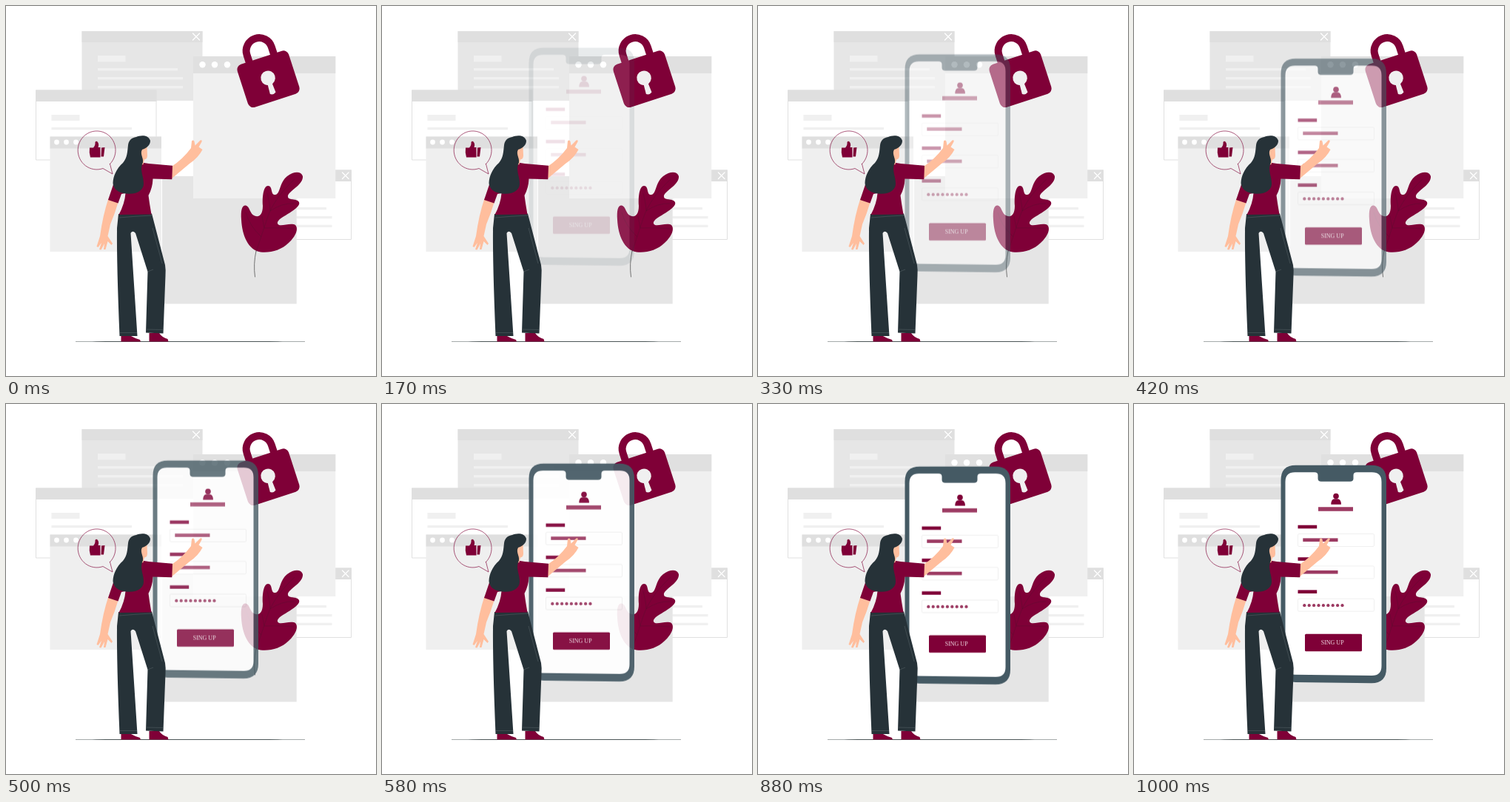
Animation, 500 px wide and 500 px high, one loop 1040 ms. Source, as an HTML page:

```html
<!DOCTYPE html>
<html lang="en">
<head>
<meta charset="utf-8">
<title>Sign up</title>
<style>
  html, body { margin: 0; width: 100%; height: 100%; overflow: hidden; background: #fff; }
  svg { display: block; width: 100vw; height: 100vh; }
  .wine { fill: #7f0037; }
  .soft { fill: #9c3a62; }
  .skin { fill: #ffbe9d; }
  .dark { fill: #263238; }
  .bar { fill: #dfdfdf; }
  .pale { fill: #f0f0f0; }
  .line { fill: none; stroke-linecap: round; stroke-linejoin: round; }
  .seam { fill: none; stroke: #5b666b; stroke-width: .5; }
  .vein { fill: none; stroke: #51132f; stroke-width: .6; opacity: .6; }
  .field { fill: #fff; stroke: #e6e6e6; stroke-width: .6; }
  #phone { opacity: 0; }
  #phone text { font: 8px "Liberation Serif", "Times New Roman", serif; fill: #f0dce4; }
</style>
</head>
<body>
<svg viewBox="0 0 500 500">
  <g id="windows">
    <path fill="#e6e6e6" d="M102.500 34H265.500V128H102.500Z"/>
    <path class="bar" d="M102.500 34H265.500V49H102.500Z"/>
    <path class="line" stroke="#fff" stroke-width="1.300" d="M252.500 37l9 9m0-9l-9 9"/>
    <path class="pale" d="M124 67h37.500v8.500H124zM124 84h108v3.200H124zM124 96h115v3.200H124zM124 108h115v3.200H124z"/>

    <path fill="#fff" stroke="#e0e0e0" d="M40.500 114H203V208H40.500Z"/>
    <path class="bar" d="M40 113.500H203.500V129H40Z"/>
    <path class="pale" d="M61.500 147h38v8h-38zM61.500 164h108.500v3.300h-108.500z"/>

    <path fill="#efefef" d="M59.500 176.500H210V332H59.500Z"/>
    <path class="bar" d="M59.500 176.500H210V192.500H59.500Z"/>
    <g fill="#fff"><circle cx="68.500" cy="184" r="3.400"/><circle cx="81.500" cy="184" r="3.400"/><circle cx="94.500" cy="184" r="3.400"/></g>

    <path fill="#fff" stroke="#e0e0e0" d="M303 222H466.500V315.500H303Z"/>
    <path class="bar" d="M303 221.500H467V237H303Z"/>
    <path class="line" stroke="#fff" stroke-width="1.300" d="M454.500 225l8.500 8.500m0-8.500l-8.500 8.500"/>
    <path class="pale" d="M325 272h108v3.200H325zM325 284h115.500v3.200H325zM325 295.800h115.500v3.200H325z"/>

    <path fill="#e5e5e5" d="M211 230H392.700V402.500H211Z"/>
    <path fill="#f0f0f0" d="M253 68H445.300V260H253Z"/>
    <path fill="#e0e0e0" d="M253 68H445.300V91H253Z"/>
    <g fill="#fff"><circle cx="265.500" cy="79.300" r="4.200"/><circle cx="282" cy="79.300" r="4.200"/><circle cx="299" cy="79.300" r="4.200"/></g>
  </g>

  <g id="lock" transform="translate(354.500 98.700) rotate(-18)">
    <path class="line" stroke="#7f0037" stroke-width="10" stroke-linecap="butt" d="M-17.500-26V-40a17.500 17.500 0 0 1 35 0V-26"/>
    <rect class="wine" x="-36.500" y="-30.500" width="73" height="61" rx="7.500"/>
    <path class="pale" d="M-3 5L-4 20Q0 23 4 20L3 5Z"/>
    <circle class="pale" cy="-1.500" r="9.800"/>
  </g>

  <g id="leaf">
    <path class="wine" d="M344 332.500C327 330 319 309 318 289C317 276 319 269 324 269.500C330 271 329 281 336 283.500C343 286 347 281 347 270C346 254 349 243 354 243C361 243 357 256 364 255C371 254 369 239 380 230C389 223 399 223 401 230C402 241 384 249 381 256C380 263 389 260 394 263C400 267 393 273 387 277C379 283 366 288 367 294C369 300 384 292 391 296C396 301 391 312 382 320C372 330 357 334 344 332.500Z"/>
    <path class="vein" d="M390 234C374 249 360 266 353 287Q346 308 338 332M353 253Q357 269 357 277M357 277Q373 266 389 267M349 300Q371 299 389 301M345 312Q329 297 324 279M349 300L346 284"/>
    <path class="line" stroke="#555" stroke-width=".8" d="M338 331Q334 349 336.500 366"/>
  </g>

  <g id="phone">
    <path fill="#455a64" d="M218.500 82.700H321Q341 82.700 341 102.700V357.300Q341 377.300 321 377.300L218.500 376Q198.500 375.500 198.500 356V102.700Q198.500 82.700 218.500 82.700Z"/>
    <path fill="#fff" d="M217.500 92.200H244Q248.500 92.200 248.500 96.200V100.700Q248.500 104.700 253 104.700H292Q296.500 104.700 296.500 100.700V96.200Q296.500 92.200 301 92.200H321.500Q334.500 92.200 334.500 105.200V354Q334.500 367 321.500 367L217.500 365.800Q204.500 365.500 204.500 353V105.200Q204.500 92.200 217.500 92.200Z"/>
    <circle class="wine" cx="273" cy="124.500" r="3.800"/>
    <path class="wine" d="M266.300 135.700Q266.300 128.700 271 128.300H275Q279.900 128.700 279.900 135.700Z"/>
    <path class="soft" d="M249 139.200h47v5.500h-47z"/>
    <g id="form"></g>
    <rect class="wine" x="231" y="310.700" width="77" height="23.500" rx="1.500"/>
    <text x="252.700" y="325">SING UP</text>
  </g>

  <path fill="#4c5657" d="M94 453.200H404V453.700H94ZM112 453.500Q120 452.900 135 452.900H355Q372 452.900 380 453.500Q368 454 355 454H135Q120 454 112 453.500Z"/>

  <g id="bubble">
    <path class="line" stroke="#7f0037" stroke-width=".65" d="M140.500 213.500L144 227L131 219.500A25.500 26 0 1 1 140.500 213.500Z"/>
    <path class="wine" d="M113 191.500H118Q121 188 120.500 184Q122 181.500 124 184Q126 187 124.500 191H127.500V204.500H114Q112 198 113 191.500ZM129 191.500L133.500 191L132 203.500H128.500Z"/>
  </g>

  <g id="woman">
    <path class="skin" d="M138.500 260L152 264Q147 281 141 295L137.500 311L144 321L142.500 323L137.500 318L134.500 329L132 329L133 321L128.500 329.500L126 329L129 320L124.500 326L122.500 325L127 311Q131 282 138.500 260Z"/>
    <path class="skin" d="M223 217.500Q239 207 250 192L251 182.500Q253 180.500 254.500 183L255.500 188.500L262.500 181.500Q265.500 180.500 264.500 183.500L260.500 190.500L265.500 194Q260 205 248 213L223 234Z"/>
    <path class="wine" d="M155.500 446L168 445.500Q174 449 181 451L182 453.500H155.500ZM193.500 442H207Q211 448 218.500 450L219.500 453.500H193.500Z"/>
    <path class="dark" d="M152 281L197 280.500L215 350Q216 356 215.500 364L212.500 442.500L189 441.500L191.500 359L175 307Q171 302.500 168.500 307L177.500 446L153.500 446Q149.500 350 150 300Z"/>
    <path class="seam" d="M153 286Q175 284 197 283M198 300L211 348M191.500 359L199 356M154 441.500L177 441.500M190 437L212 437.500"/>
    <path class="wine" d="M180 211Q187 212 193 213L225 215.800L224.300 234.200L198.500 233.500Q198 246 192.500 256Q194 268 196.500 281.500L152.500 282Q160.500 267 161.500 253L156 254L151.500 266.500L138 262L148.500 231Z"/>
    <path class="skin" d="M181 190H190.500L191 202Q191 207 187 207.500L185.500 214L179 216Z"/>
    <path class="dark" d="M195 182C193 174 182 174 176 177C170 178 166 181 165 188C164 197 164 205 158 212C149 220 145 230 144.500 239C145 250 157 254 167 253.800C179 253.500 186 248 186 240C186 230 181 223 184 214C188 207 180 201 184 194C190 192 195 188 195 182Z"/>
  </g>
</svg>
<script>
  const LOOP = 1040, FRAMES = 24, DROP = 30;

  // Three labelled fields: two filled lines and a masked password
  const rows = [163.700, 207.200, 251.400];
  const box = (cls, x, y, w, h, r = 0) =>
    `<rect class="${cls}" x="${x}" y="${y}" width="${w}" height="${h}" rx="${r}"/>`;
  const dots = y => Array.from({ length: 9 }, (_, i) =>
    `<circle class="soft" cx="${230.300 + i * 6.400}" cy="${y}" r="2.100"/>`).join("");
  document.getElementById("form").innerHTML = rows.map((y, i) =>
    box("wine", 221.500, y, 25.700, 4.600) +
    box("field", 221.500, y + 11.800, 103, 17, 1.500) +
    (i < 2 ? box("soft", 228.300, y + 17.700, 47.200, 4.600) : dots(y + 20.800))
  ).join("");

  const bezier = (a, b, s) => 3 * (1 - s) ** 2 * s * a + 3 * (1 - s) * s * s * b + s ** 3;

  // Ease in, overshoot slightly, settle
  function ease(x) {
    let lo = 0, hi = 1;
    for (let n = 0; n < 30; n++) {
      const mid = (lo + hi) / 2;
      if (bezier(0.42, 0.44, mid) < x) lo = mid; else hi = mid;
    }
    return bezier(0.12, 1.36, hi);
  }

  // Each pose is held for one 24 fps tick
  const steps = Array.from({ length: FRAMES + 1 }, (_, i) => {
    const p = ease(i / FRAMES);
    return {
      offset: Math.round(i * 100 / FRAMES) * 10 / LOOP,
      opacity: Math.min(1, p),
      transform: `translateY(${((p - 1) * DROP).toFixed(3)}px)`,
      easing: "steps(1, end)"
    };
  });
  steps[0].opacity = 0;
  steps.push({ ...steps[FRAMES], offset: 1 });

  document.getElementById("phone").animate(steps, { duration: LOOP, iterations: Infinity });
</script>
</body>
</html>
```
